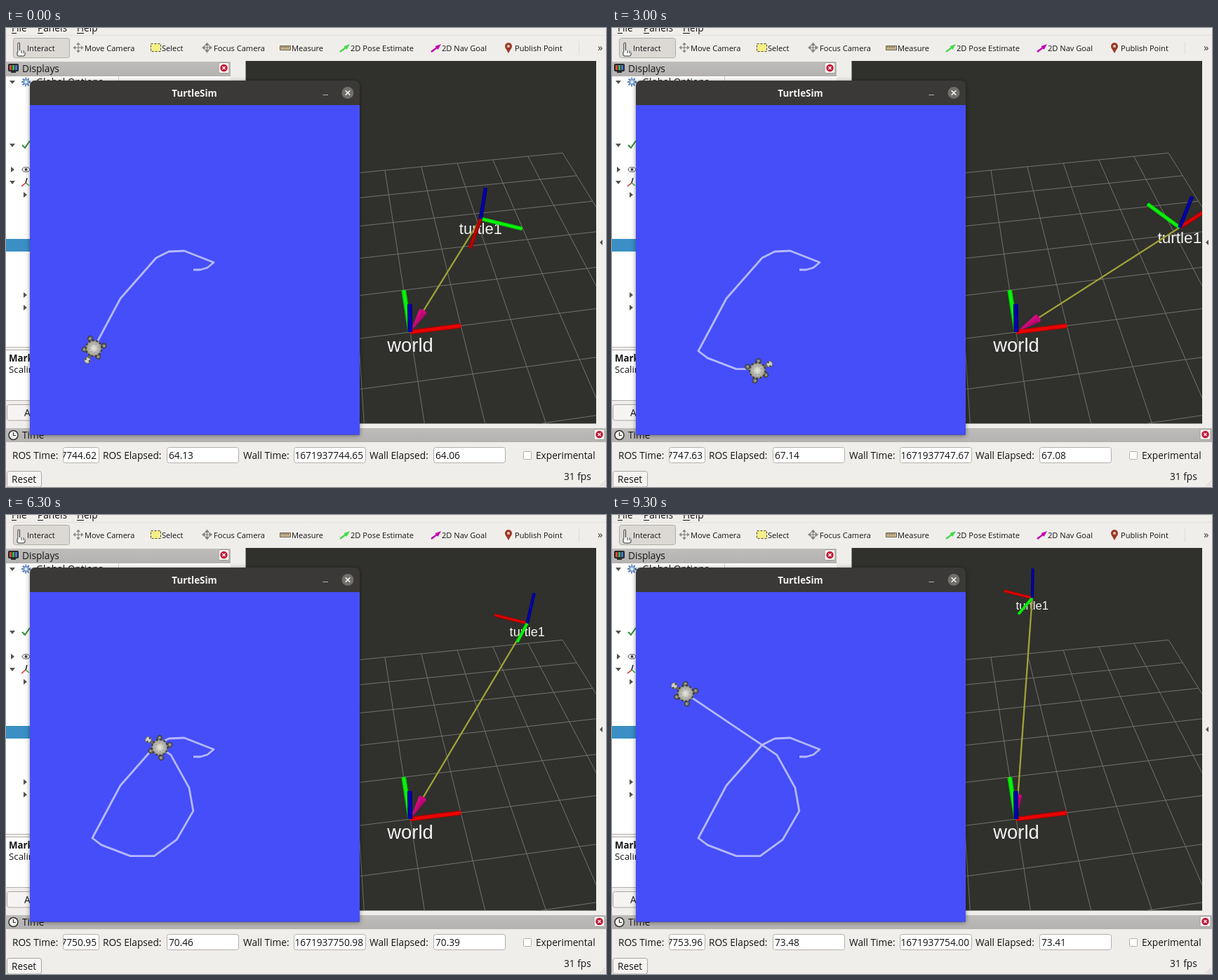
Write an HTML page with a canvas that moves like this. It is 855 px wide and 655 px high and loops after 9.4 s.

```html
<!DOCTYPE html>
<html lang="en">
<head>
<meta charset="utf-8">
<title>TurtleSim and transforms</title>
<style>
html, body { margin: 0; width: 100%; height: 100%; overflow: hidden; background: #f0eeeb; }
canvas { display: block; }
</style>
</head>
<body>
<canvas id="stage" width="855" height="655"></canvas>
<script>
const c = document.getElementById('stage').getContext('2d');
const LOOP = 9400, STEP = 100, RAD = Math.PI / 180;
const UI = '"Open Sans", "Noto Sans", sans-serif';
const SANS = '"Liberation Sans", Arial, sans-serif';
const INK = '#141414', PAPER = '#f0eeeb', EDGE = '#b3afaa';

// ---- motion: the turtle waits, turns on the spot, then drives ----
const DRIVE = 86, TURN = 118; // pixels and degrees per second
const steps = [
  { wait: .665, turn: 81, drive: 16.4 },
  { turn: 16, drive: 44 },
  { turn: 21, drive: 34 },
  { turn: 36, drive: 39.4 },
  { turn: 24, drive: 47.5 },
  { turn: 40, drive: 33.5 },
  { turn: 19, drive: 53.7 },
  { turn: 27, drive: 77 },
  { wait: .875, turn: 0, drive: 84.5 }
];
const earlierTrail = [[267, 345], [277, 345], [287, 342], [296, 334.5], [254, 318], [232, 319], [214, 328], [163, 386]];

function turtleAt(seconds) {
  let x = 123, y = 461, deg = -118, left = seconds;
  const trail = [...earlierTrail, [x, y]];
  const spend = duration => {
    const used = Math.min(left, duration);
    left -= used;
    return used;
  };
  for (const { wait = 0, turn, drive } of steps) {
    spend(wait);
    deg += TURN * spend(turn / TURN);
    const far = DRIVE * spend(drive / DRIVE);
    x += far * Math.cos(deg * RAD);
    y -= far * Math.sin(deg * RAD);
    trail.push([x, y]);
  }
  return { x, y, heading: deg * RAD, trail };
}

// ---- drawing helpers ----
function box(x, y, w, h, fill, stroke, r = 0) {
  c.beginPath();
  c.roundRect(x, y, w, h, r);
  if (fill) { c.fillStyle = fill; c.fill(); }
  if (stroke) { c.strokeStyle = stroke; c.lineWidth = 1; c.stroke(); }
}
function text(s, x, y, size = 13.7, color = INK, align = 'left', weight = 500, family = UI) {
  c.font = `${weight} ${size}px ${family}`;
  c.textAlign = align;
  c.fillStyle = color;
  c.fillText(s, x, y);
}
function line(points, color, width = 1) {
  c.beginPath();
  points.forEach(p => c.lineTo(p[0], p[1]));
  c.strokeStyle = color;
  c.lineWidth = width;
  c.stroke();
}
function poly(points, fill) {
  c.beginPath();
  points.forEach(p => c.lineTo(p[0], p[1]));
  c.fillStyle = fill;
  c.fill();
}
function disc(x, y, r, fill, stroke, width = 1) {
  c.beginPath();
  c.arc(x, y, r, 0, 7);
  if (fill) { c.fillStyle = fill; c.fill(); }
  if (stroke) { c.strokeStyle = stroke; c.lineWidth = width; c.stroke(); }
}
function clipped(x, y, w, h, draw) {
  c.save();
  c.beginPath();
  c.rect(x, y, w, h);
  c.clip();
  draw();
  c.restore();
}
function placed(x, y, angle, draw) {
  c.save();
  c.translate(x, y);
  c.rotate(angle);
  draw();
  c.restore();
}
function cross(x, y, r, width) {
  line([[x - r, y - r], [x + r, y + r]], '#fff', width);
  line([[x + r, y - r], [x - r, y + r]], '#fff', width);
}

// ---- 3D view ----
function project(x, y, z = 0) {
  const d = 1 + .009 * x + .08 * y - .089 * z;
  return [(576 + 78 * x + 36 * y - 52 * z) / d, (434 - 5.3 * x - 29.96 * y - 75 * z) / d, d];
}
function rod(a, b, dark, light) {
  const w = 6.8 / a[2];
  line([a, b], dark, w);
  line([a, b], light, w * .6);
}
function axes(x, y, heading) {
  const o = project(x, y), cos = Math.cos(heading), sin = Math.sin(heading);
  const red = 150 + 85 * Math.abs(cos);
  const arms = [
    [project(x + cos, y + sin), `rgb(${red * .75},0,0)`, `rgb(${red},0,0)`],
    [project(x - sin, y + cos), '#00c800', '#0cf20c'],
    [project(x, y, 1), '#00006e', '#0000b2']
  ];
  arms.sort((p, q) => q[0][2] - p[0][2]);
  arms.forEach(([tip, dark, light]) => rod(o, tip, dark, light));
}
function label(name, x, y) {
  const [u, v, d] = project(x, y), size = 27.4 / d;
  text(name, u, v + size * 1.01, size, '#f4f4f4', 'center', 400, SANS);
}
function arrow(x, y) {
  const k = .53 / Math.hypot(x, y);
  const far = project(x, y), base = project(x * k, y * k), tip = project(0, 0);
  const dx = tip[0] - base[0], dy = tip[1] - base[1];
  line([far, base], '#85882f', 2.4);
  line([far, base], '#a5a83c', 1.5);
  placed(base[0], base[1], Math.atan2(dy, dx), () => {
    const shade = c.createLinearGradient(0, -6, 0, 6);
    shade.addColorStop(0, '#a80062');
    shade.addColorStop(1, '#e0128a');
    poly([[0, -6], [Math.hypot(dx, dy), 0], [0, 6]], shade);
    c.beginPath();
    c.ellipse(0, 0, 2.5, 6, 0, 0, 7);
    c.fillStyle = '#c8087a';
    c.fill();
  });
}
function view3d(pose) {
  clipped(341.5, 47, 499.5, 517.5, () => {
    box(341, 47, 500, 518, '#30302d');
    for (let i = -5; i <= 5; i++) {
      line([project(i, -5), project(i, 5)], '#71716f');
      line([project(-5, i), project(5, i)], '#71716f');
    }
    const x = (pose.x - 34) / 42.3, y = (580 - pose.y) / 42.3;
    label('turtle1', x, y);
    label('world', 0, 0);
    arrow(x, y);
    axes(x, y, pose.heading);
    axes(0, 0, 0);
  });
}

// ---- turtle window ----
function turtle({ x, y, heading }) {
  placed(x, y, -heading, () => {
    c.translate(-4.5, 0); // the shell sits behind the pivot
    for (const side of [-1, 1]) for (const lx of [7.5, -10]) {
      disc(lx, 11 * side, 3.4, '#74746d', '#3d3d37', 1.2);
      disc(lx + .5, 11.5 * side, 1.3, '#a9a9a1');
    }
    line([[9, 0], [18, 0]], '#66665f', 4);
    disc(19.5, 0, 4.2, '#cfcfc4', '#6a6a62');
    for (const side of [-1, 1]) disc(19, 3 * side, 1.2, '#30302c');
    const shell = c.createRadialGradient(0, 0, 1, 0, 0, 12);
    shell.addColorStop(0, '#e2e2d9');
    shell.addColorStop(.65, '#b0b0a8');
    shell.addColorStop(1, '#7b7b73');
    disc(0, 0, 11.5, shell);
    c.setLineDash([3, 2.5]);
    disc(0, 0, 11.3, null, '#3a3a35', 2);
    c.setLineDash([1.5, 3]);
    disc(0, 0, 6, null, '#8c8c84', 1);
  });
}
function turtleWindow(pose) {
  c.save();
  c.shadowColor = 'rgba(0,0,0,.45)';
  c.shadowBlur = 6;
  c.shadowOffsetY = 1;
  box(34, 75, 470, 505.5, '#3b3937', null, [7, 7, 0, 0]);
  c.restore();
  box(34, 110, 470, 470.5, '#454ef8');
  text('TurtleSim', 268.5, 98, 13.4, '#f4f3f0', 'center', 700);
  line([[451.5, 95.5], [459, 95.5]], '#b5b3af');
  disc(487, 92.5, 8.5, '#716f6b');
  cross(487, 92.5, 3.3, 1.4);
  c.lineJoin = 'round';
  line(pose.trail, '#b5b9ff', 2.8);
  c.lineJoin = 'miter';
  turtle(pose);
}

// ---- surrounding panels ----
function closeIcon(x, y) {
  box(x - 7.5, y - 7.5, 15, 15, '#f4f1ee', '#a09c97', 2);
  disc(x, y, 5.2, '#c01838');
  cross(x, y, 2, 1.3);
}
function header(y, h, w) {
  const g = c.createLinearGradient(0, y, 0, y + h);
  g.addColorStop(0, '#bfbdbb');
  g.addColorStop(1, '#b4b2b0');
  box(0, y, w, h, g);
}
function twisty(x, y, open) {
  placed(x, y, open ? Math.PI / 2 : 0, () => poly([[-2, -4], [3, 0], [-2, 4]], '#55534f'));
}
function crossArrows(x, y) {
  for (let i = 0; i < 4; i++) placed(x, y, i * Math.PI / 2, () => {
    line([[0, 0], [6, 0]], '#77746f');
    poly([[7.5, 0], [4, -3], [4, 3]], '#8b8883');
  });
}
function slantArrow(x, y, color) {
  line([[x - 6, y + 5], [x + 2, y - 1]], color, 2.4);
  poly([[x + 8, y - 6], [x + 3.5, y + 2], [x - .5, y - 3]], color);
}
function handIcon(x, y) {
  box(x + 1, y + 5, 11, 7, '#fff', '#2a2a2a', 2);
  box(x + 2, y - 7, 2.5, 13, '#fff', '#2a2a2a', 1);
  box(x + 2.5, y + 4, 9, 4, '#fff');
  for (const dx of [7, 10]) line([[x + dx, y + 4], [x + dx, y + 8]], '#2a2a2a');
}
function menuItem(name, x, underline) {
  text(name, x, 5);
  line([[x, 7.5], [x + underline, 7.5]], INK);
}
function tool(name, x) {
  text(name, x, 32.5, 11.1);
}
function toolbar() {
  menuItem('File', 8, 7);
  menuItem('Panels', 45, 8);
  menuItem('Help', 101, 10);
  line([[0, 10.5], [855, 10.5]], '#e4e0dc');
  box(10.5, 14.5, 80, 28, '#dcd9d5', '#b1ada8', 3);
  handIcon(15, 28);
  tool('Interact', 30);
  crossArrows(103, 28);
  tool('Move Camera', 112);
  box(206.5, 22.5, 14, 11, '#f5ef87');
  c.setLineDash([3, 2]);
  box(206.5, 22.5, 14, 11, null, '#4b4930');
  c.setLineDash([]);
  tool('Select', 222);
  crossArrows(286.5, 28);
  disc(286.5, 28, 4, null, '#77746f');
  tool('Focus Camera', 296);
  box(390.5, 25.5, 15, 6, '#c9b892', '#6a5d42');
  for (let x = 393; x < 405; x += 3) line([[x, 26], [x, 29]], '#6a5d42');
  tool('Measure', 407);
  slantArrow(482, 29, '#45d84b');
  tool('2D Pose Estimate', 491);
  slantArrow(612, 29, '#c400b4');
  tool('2D Nav Goal', 621);
  poly([[711.5, 28], [720.5, 28], [716, 36]], '#9b3825');
  disc(716, 26, 5, '#9b3825');
  disc(716, 26, 2, '#e8cabb');
  tool('Publish Point', 725);
  line([[816.5, 19], [816.5, 38]], '#dedad6');
  text('»', 843, 33, 15, '#333');
}
function displaysPanel() {
  header(48, 21, 320);
  box(3.5, 51.5, 14, 10, '#2a2d30', '#222', 1);
  ['#d8493a', '#49b04d', '#4775d2'].forEach((color, i) => box(5 + 4 * i, 53, 3, 7, color));
  box(7, 62, 7, 2, '#333');
  text('Displays', 23, 63);
  closeIcon(310.5, 57);
  box(0, 69, 320, 386, '#fff');
  line([[160.5, 69], [160.5, 76]], '#d0cdca');
  line([[0, 455.5], [34, 455.5]], '#b6b2ad');
  text('Global Options', 43, 82);
  for (const y of [77, 167, 220]) twisty(9, y, true);
  twisty(9, 202);
  for (const y of [238, 381, 399]) twisty(27, y);
  c.setLineDash([2, 2]);
  disc(28.5, 77, 5.5, null, '#4b78b5', 2);
  c.setLineDash([]);
  disc(28.5, 77, 4, '#9dbbe0', '#4b78b5');
  disc(28.5, 77, 1.5, '#fff');
  line([[23, 167], [27, 171], [34, 161]], '#2f8f2f', 2);
  c.beginPath();
  c.ellipse(28.5, 202, 5.5, 3.3, 0, 0, 7);
  c.strokeStyle = '#444';
  c.lineWidth = 1;
  c.stroke();
  disc(28.5, 202, 2, '#444');
  line([[22, 226], [28, 221]], '#d22', 1.5);
  line([[28, 221], [33, 225]], '#2a2', 1.5);
  line([[28, 221], [30, 214]], '#223', 1.5);
  box(0, 301, 34, 18, '#3a8fc5');
  box(-1, 459.5, 40, 72, '#fff', EDGE);
  text('Marker Scale', 4, 476, 13.3, INK, 'left', 700);
  text('Scaling factor', 4, 492, 13.3);
  button('Add', 1.5, 537.5, 60, 26, 554);
}
function button(name, x, y, w, textX, baseline) {
  box(x, y, w, 22.5, '#f6f4f2', '#aaa6a1', 3);
  text(name, textX, baseline);
}
function field(name, nameX, value, x, w, right) {
  text(name, nameX, 615);
  box(x + .5, 598.5, w, 22, '#fff', EDGE, 3);
  clipped(x + 1, 599, w - 2, 21, () =>
    right ? text(value, x + w - 3, 615, 13.7, INK, 'right') : text(value, x + 3, 615));
}
function timePanel(seconds) {
  header(571, 20, 855);
  disc(10.5, 581, 6.5, '#f3f1ee', '#333', 1.5);
  line([[10.5, 577], [10.5, 581.5], [14, 581.5]], '#333', 1.2);
  text('Time', 23, 586);
  closeIcon(845.5, 580);
  const elapsed = 64.13 + seconds * 1.005, stamp = 1671937680.487 + elapsed;
  field('ROS Time:', 9, stamp.toFixed(2), 81, 51, true);
  field('ROS Elapsed:', 138, elapsed.toFixed(2), 229, 102);
  field('Wall Time:', 338, (stamp + .034).toFixed(2), 410, 102, true);
  field('Wall Elapsed:', 518, (elapsed - .07).toFixed(2), 609, 102);
  box(737.5, 604.5, 11, 11, '#fff', EDGE, 1);
  text('Experimental', 755, 615);
  button('Reset', 1.5, 632.5, 49, 8, 648.5);
  text('31 fps', 795, 644.5);
  for (let i = 0; i < 9; i += 3) line([[846 + i, 654], [854, 646 + i]], '#cfcbc6');
}

function draw(t) {
  const seconds = t / 1000, pose = turtleAt(seconds);
  box(0, 0, 855, 655, PAPER);
  toolbar();
  displaysPanel();
  view3d(pose);
  poly([[846, 306], [850, 302], [850, 310]], '#55534f');
  timePanel(seconds);
  turtleWindow(pose);
}

let start;
function tick(now) {
  start ??= now;
  const t = (now - start) % LOOP;
  draw(Math.floor(t / STEP) * STEP);
  requestAnimationFrame(tick);
}
draw(0);
requestAnimationFrame(tick);
</script>
</body>
</html>
```
